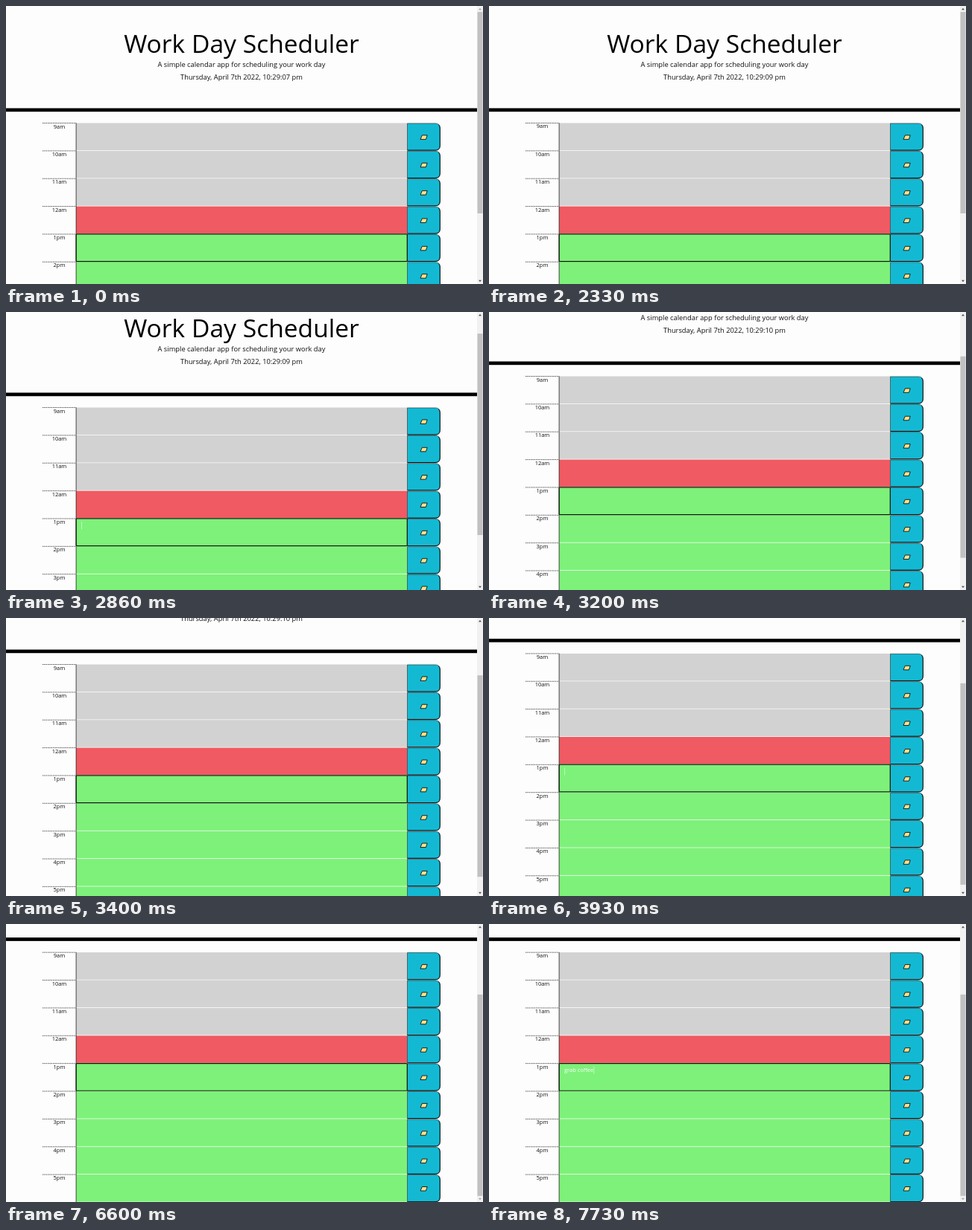
An HTML page for the animation above (8 s loop, 640 px wide and 374 px high).

```html
<!DOCTYPE html>
<html lang="en">
<head>
<meta charset="utf-8">
<title>Work Day Scheduler</title>
<style>
  html, body { margin: 0; width: 100%; height: 100%; overflow: hidden; background: #fdfdfd; }
  svg { display: block; width: 640px; height: 374px; }
  text { font-family: "Open Sans", "Noto Sans", sans-serif; font-size: 7.47px; fill: #111; }
  .center { text-anchor: middle; }
  .title { font-size: 33.6px; fill: #000; }
  .lead { font-size: 9.34px; }
  .entry { fill: #fff; }
</style>
</head>
<body>
<svg viewBox="0 0 640 374">
  <g id="page">
    <text class="center title" x="316" y="63">Work Day Scheduler</text>
    <text class="center lead" x="316" y="82">A simple calendar app for scheduling your work day</text>
    <text class="center lead" x="316" y="99" id="clock"></text>
    <rect y="137.5" width="632" height="4.7"/>
    <g id="rows"></g>
    <text class="entry" id="entry" x="101" y="318.5">grab coffee</text>
    <rect id="caret" y="311" width=".6" height="10" fill="#fff" opacity=".8"/>
  </g>
  <rect x="632" width="8" height="374" fill="#f1f1f1"/>
  <rect id="thumb" x="632.5" width="7" height="271" fill="#c1c1c1"/>
  <path id="up" d="M634 5.2l2-2.4 2 2.4z"/>
  <path id="down" d="M634 368.8l2 2.4 2-2.4z"/>
</svg>
<script>
const LOOP = 8000, STEP = 200 / 3;
const ROW_TOP = 157.5, ROW_H = 37.36, MAX_SCROLL = 119.3;
const HOURS = ["9am", "10am", "11am", "12am", "1pm", "2pm", "3pm", "4pm", "5pm"];
const NOW = 3, FOCUSED = 4;
const $ = id => document.getElementById(id);

// [time, offset] along the page scroll
const SCROLL = [[2333, 0], [2467, 3], [2600, 9], [2733, 17], [2867, 29], [3200, 71],
  [3400, 95], [3533, 103.5], [3733, 104], [3933, 109.6], [4067, 117], [4133, MAX_SCROLL]];

function row(hour, i) {
  const y = ROW_TOP + i * ROW_H;
  const color = i < NOW ? "#d2d2d2" : i === NOW ? "#f05a62" : "#7ef17a";
  return `
    <path d="M49 ${y}H94" stroke="#222" stroke-width=".8" stroke-dasharray="1.4 .93"/>
    <text class="center" x="71.5" y="${y + 7}">${hour}</text>
    <rect x="94" y="${y}" width="444.5" height="${ROW_H}" fill="${color}"/>
    <path d="M94 ${y + ROW_H - .3}H538" stroke="#fff" stroke-width=".9"/>
    <path d="M94.1 ${y}v${ROW_H}" stroke="#222" stroke-width=".8"/>
    <path d="M538.5 ${y + .4}h37.5q6.3 0 6.3 6.3v23.6q0 6.3 -6.3 6.3h-37.5z"
      fill="#13b9d3" stroke="#222" stroke-width=".6"/>
    <path d="M580.5 ${y + 2.3}q1.8 1.8 1.8 4.4v23.6q0 6.3 -6.3 6.3h-37.5"
      fill="none" stroke="#111" stroke-width="1"/>
    <path d="M558.3 ${y + 16.4}h6.9l-1.8 5.5h-7.4z" fill="#ffe08a" stroke="#111" stroke-width=".9"
      stroke-linejoin="round"/>`;
}

const focusRing = `<rect x="94.1" y="${ROW_TOP + FOCUSED * ROW_H - .1}" width="444.2" height="36.7"
  rx="1" fill="none" stroke="#0a1a0a" stroke-width="1.2"/>`;
$("rows").innerHTML = HOURS.map(row).join("") + focusRing;

function scrollAt(t) {
  const next = SCROLL.findIndex(p => p[0] > t);
  if (next < 0) return MAX_SCROLL;
  if (next === 0) return 0;
  const [t0, y0] = SCROLL[next - 1], [t1, y1] = SCROLL[next];
  return y0 + (y1 - y0) * (t - t0) / (t1 - t0);
}

function render(time) {
  const t = time % LOOP;
  const scroll = scrollAt(Math.floor((t + 10) / STEP) * STEP);
  const seconds = 7 + (t >= 930) + (t >= 1990) + (t >= 3000) + (t >= 4000);
  const typed = t >= 7725;
  const caretOn = t >= 320 && (t - 320) % 1055 < 522;

  $("page").setAttribute("transform", `translate(0 ${-scroll})`);
  $("thumb").setAttribute("y", 8 + scroll * .728);
  $("up").setAttribute("fill", scroll > 0 ? "#505050" : "#a3a3a3");
  $("down").setAttribute("fill", scroll < MAX_SCROLL ? "#505050" : "#a3a3a3");
  $("clock").textContent = `Thursday, April 7th 2022, 10:29:${String(seconds).padStart(2, "0")} pm`;
  $("entry").setAttribute("visibility", typed ? "visible" : "hidden");
  $("caret").setAttribute("x", typed ? 140.6 : 101.2);
  $("caret").setAttribute("visibility", typed || caretOn ? "visible" : "hidden");
}

const start = performance.now();
function tick() {
  render(performance.now() - start);
  requestAnimationFrame(tick);
}
tick();
</script>
</body>
</html>
```
